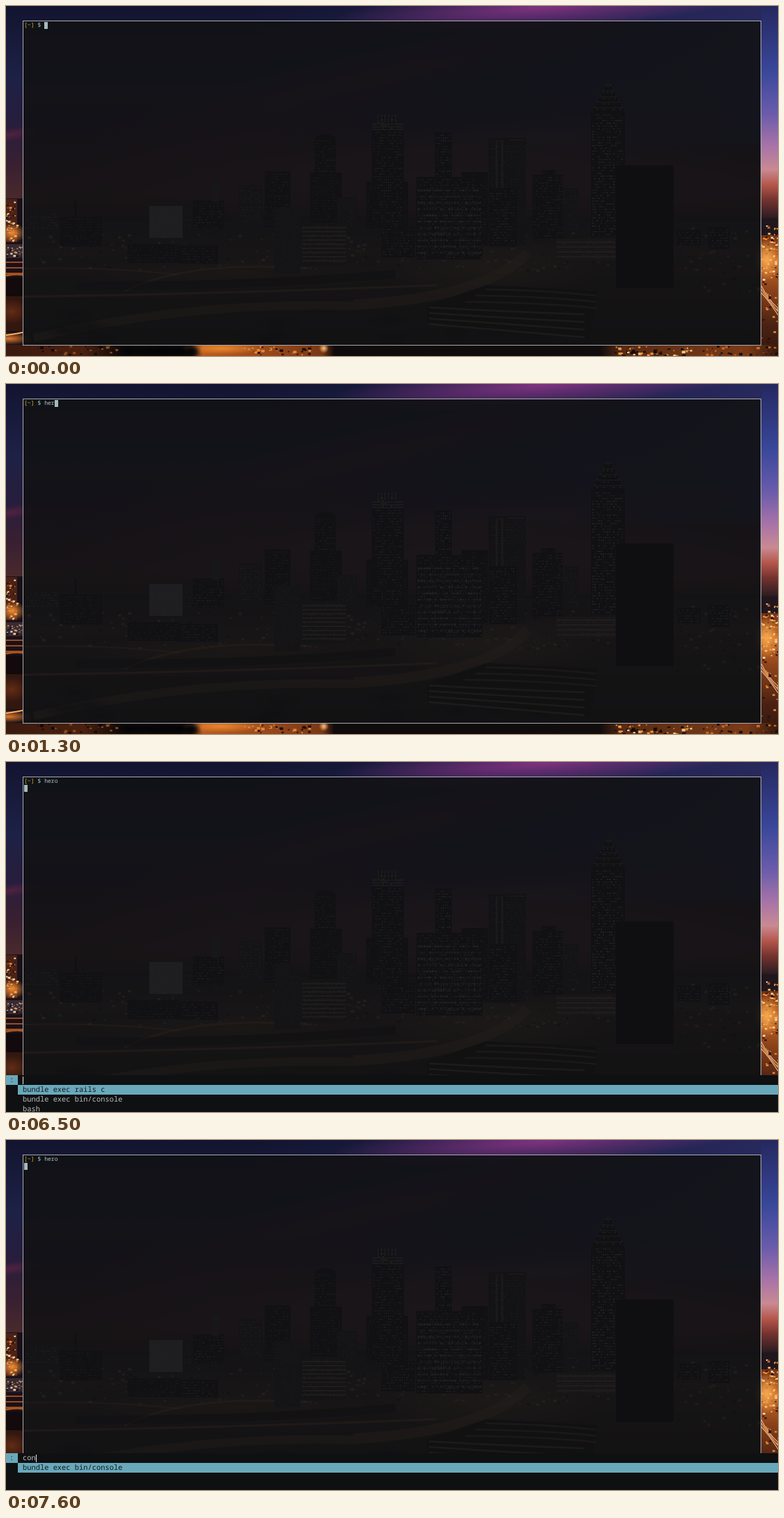
These frames come from a looping animation (1110 px wide and 504 px high, 8000 ms). An HTML page with a canvas:

```html
<!DOCTYPE html>
<html lang="en">
<head>
<meta charset="utf-8">
<title>Terminal launcher</title>
<style>
html, body { margin: 0; width: 100%; height: 100%; overflow: hidden; background: #0f1012; }
#stage { position: relative; width: 1110px; height: 504px; overflow: hidden;
  font-family: "Noto Sans Mono", monospace; text-rendering: geometricPrecision; white-space: pre; }
canvas { position: absolute; left: 0; top: 0; }
#shell { position: absolute; left: 26px; top: 23px; font-size: 8.1px; line-height: 10px; color: #adcbc2; }
#shell b { font-weight: 400; color: #c9b21f; }
#block { position: absolute; width: 5px; height: 10px; background: #a3bcbd; }
#menu { position: absolute; left: 0; width: 1110px; height: 110px; background: #0f1011;
  font-size: 10.4px; line-height: 14px; color: #b9bebd; }
#menu div { position: absolute; box-sizing: border-box; height: 14px; left: 17px; width: 1093px; padding-left: 7px; }
#menu .on, #menu .tag { background: #69a8bb; color: #10181b; }
#menu .tag { left: 0; top: 0; width: 17px; padding-left: 5px; }
#caret { position: absolute; top: 2px; width: 1px; height: 11px; background: #e4e8e8; }
</style>
</head>
<body>
<div id="stage">
  <canvas id="scene" width="1110" height="504"></canvas>
  <div id="shell"><b>[~]</b> $ <span id="typed"></span></div>
  <div id="block"></div>
  <div id="menu"></div>
</div>
<script>
const $ = id => document.getElementById(id);
const ctx = $('scene').getContext('2d');

let seed = 7;
const rand = () => (seed = (seed * 16807) % 2147483647) / 2147483647;

function rect(color, x, y, w, h) {
  ctx.fillStyle = color;
  ctx.fillRect(x, y, w, h);
}

function blend(x0, y0, x1, y1, colors) {
  const g = ctx.createLinearGradient(x0, y0, x1, y1);
  for (const [at, color] of colors) g.addColorStop(at, color);
  return g;
}

// Soft elliptical light
function glow(x, y, rx, ry, rgb, alpha, tilt = 0) {
  ctx.save();
  ctx.translate(x, y);
  ctx.rotate(tilt);
  ctx.scale(rx, ry);
  const g = ctx.createRadialGradient(0, 0, 0, 0, 0, 1);
  g.addColorStop(0, `rgba(${rgb},${alpha})`);
  g.addColorStop(.5, `rgba(${rgb},${alpha * .5})`);
  g.addColorStop(1, `rgba(${rgb},0)`);
  rect(g, -1, -1, 2, 2);
  ctx.restore();
}

function sparks(x, y, w, h, count, colors, size = 2) {
  for (let i = 0; i < count; i++) {
    const s = .7 + rand() * size;
    rect(colors[i % colors.length], x + rand() * w, y + rand() * h, s * 1.4, s);
  }
}

function tower(x, y, w, bottom, lit = .2, color = '#15121a') {
  rect(color, x, y, w, bottom - y);
  for (let r = y + 3; r < bottom - 2; r += 4)
    for (let c = x + 2; c < x + w - 2; c += 3)
      if (rand() < .6) rect(`rgba(225,205,195,${rand() * lit * 1.5})`, c, r, 2, 2);
}

function stripes(x, y, w, count, gap, color) {
  for (let i = 0; i < count; i++) rect(color, x, y + i * gap, w, 2);
}

function road(color, width, x0, y0, cx, cy, x1, y1) {
  ctx.strokeStyle = color;
  ctx.lineWidth = width;
  ctx.beginPath();
  ctx.moveTo(x0, y0);
  ctx.quadraticCurveTo(cx, cy, x1, y1);
  ctx.stroke();
}

function drawSky() {
  rect(blend(0, 0, 0, 310, [[0, '#12142f'], [.33, '#1d2146'], [.55, '#271d3c'],
    [.75, '#3a2030'], [.9, '#4a2a2c'], [1, '#2a1c1c']]), 0, 0, 1110, 504);
  rect(blend(350, 0, 1110, 0, [[0, 'rgba(46,46,104,0)'], [1, 'rgba(46,46,104,.8)']]), 0, 0, 1110, 200);
  glow(770, 2, 300, 32, '150,55,140', .8, -.06);
  glow(520, 105, 430, 38, '105,45,70', .5, -.22);
  glow(330, 190, 330, 40, '90,40,60', .45, -.18);
  glow(760, 190, 380, 30, '95,60,95', .5, -.1);
  glow(650, 245, 560, 85, '135,80,85', .6);
  glow(8, 185, 45, 10, '115,38,70', .5, -.15);
  rect(blend(1086, 0, 1086, 310, [[0, '#25285f'], [.3, '#39479a'], [.5, '#6a5cab'], [.65, '#a873a8'],
    [.76, '#c98a92'], [.83, '#b5574b'], [.9, '#74332f'], [1, '#20181f']]), 1086, 0, 24, 310);
}

function drawGround() {
  rect(blend(0, 300, 0, 504, [[0, '#211b20'], [.25, '#45352b'], [.6, '#30251e'], [1, '#181210']]), 0, 304, 1110, 200);
  glow(690, 375, 170, 45, '150,110,70', .6);
  glow(330, 385, 230, 25, '150,100,55', .45);
  const amber = 'rgba(215,145,80,.55)';
  road('rgba(170,125,85,.45)', 12, 40, 478, 260, 425, 500, 432);
  road('rgba(180,135,85,.45)', 15, 500, 430, 690, 420, 750, 355);
  road(amber, 3, 0, 419, 300, 415, 620, 402);
  road(amber, 3, 170, 411, 260, 365, 440, 378);
  road(amber, 2, 20, 378, 150, 375, 250, 387);
  road('rgba(0,0,0,.55)', 12, 100, 403, 350, 404, 560, 386);
  sparks(30, 325, 850, 55, 240, ['rgba(235,190,140,.65)', 'rgba(225,160,90,.55)', 'rgba(200,205,215,.5)', 'rgba(8,6,8,.6)'], 3);
  sparks(960, 318, 125, 100, 80, ['rgba(225,160,95,.6)', 'rgba(8,6,8,.6)'], 3);
  for (let i = 0; i < 14; i++)
    glow(30 + rand() * 800, 440 + rand() * 45, 35, 13, '0,0,0', .7);
}

function drawSkyline() {
  const haze = '#292530';
  tower(25, 296, 50, 325, .3, haze);
  tower(78, 303, 60, 346);
  tower(98, 280, 4, 305, 0);
  tower(206, 288, 48, 334, .12, '#868386');
  tower(254, 288, 16, 325, .2, haze);
  tower(269, 280, 45, 322, .35);
  tower(296, 254, 11, 282, .2, '#45444c');
  tower(335, 258, 34, 315, .25, haze);
  tower(372, 238, 37, 318, .25);
  ctx.beginPath();
  ctx.fillStyle = '#15121a';
  ctx.ellipse(459, 192, 15, 8, 0, 0, 7);
  ctx.fill();
  tower(444, 190, 30, 305, .3);
  tower(437, 240, 46, 312, .2);
  tower(476, 275, 28, 320, .2, haze);
  tower(518, 253, 60, 320, .2);
  tower(526, 178, 46, 320, .35);
  tower(533, 160, 28, 178, .6);
  stripes(527, 169, 44, 3, 4, 'rgba(205,195,190,.42)');
  for (let x = 534; x < 562; x += 5) rect('rgba(180,175,180,.45)', x, 156, 2, 12);
  tower(617, 182, 24, 258, .5);
  tower(655, 239, 38, 345, .25);
  tower(590, 246, 95, 365, .35);
  for (let y = 264; y < 360; y += 9)
    for (let x = 592; x < 681; x += 4) rect(`rgba(225,215,205,${rand() * .7})`, x, y, 3, 3);
  tower(694, 190, 53, 345, .2, '#251c1d');
  for (const x of [704, 712]) rect('rgba(200,150,115,.45)', x, 194, 3, 70);
  rect('rgba(210,125,55,.5)', 724, 192, 21, 2);
  tower(694, 262, 40, 346, .4);
  tower(757, 243, 44, 335, .35);
  tower(770, 236, 20, 245, .2);
  tower(803, 262, 20, 325, .2, haze);
  tower(841, 153, 49, 332, .55);
  for (let i = 0; i < 5; i++) {
    tower(844 + i * 4, 145 - i * 8, 44 - i * 8, 154 - i * 8, .5);
    rect('rgba(210,205,210,.45)', 845 + i * 4, 145 - i * 8, 42 - i * 8, 2);
  }
  rect('#4a4650', 865, 108, 2, 10);
  tower(386, 290, 37, 385, .15, '#302520');
  tower(424, 313, 65, 374, .25, '#352925');
  stripes(426, 318, 63, 9, 6, 'rgba(210,185,165,.5)');
  tower(540, 318, 48, 362, .4);
  tower(175, 343, 75, 370, .2);
  tower(250, 345, 55, 371, .3);
  tower(790, 335, 87, 366, .25, '#4c4038');
  stripes(792, 339, 84, 4, 7, 'rgba(210,190,165,.5)');
  rect('#000', 877, 229, 83, 177);
  rect('rgba(70,70,85,.4)', 877, 229, 83, 1);
  tower(965, 322, 34, 345, .35);
  tower(1010, 318, 30, 350, .35);
}

// Parking decks in the foreground
function drawDecks() {
  ctx.fillStyle = '#120e0c';
  ctx.beginPath();
  ctx.moveTo(604, 432);
  ctx.lineTo(690, 402);
  ctx.lineTo(850, 410);
  ctx.lineTo(840, 480);
  ctx.lineTo(606, 455);
  ctx.fill();
  for (let i = 0; i < 4; i++)
    road('rgba(205,180,135,.55)', 2.5, 608, 434 + i * 8, 715, 440 + i * 9, 832, 444 + i * 11);
  for (let i = 0; i < 3; i++)
    road('rgba(205,180,115,.45)', 2.5, 690 - i * 15, 408 + i * 9, 770, 409 + i * 9, 848, 417 + i * 9);
}

// The bright city rim that stays uncovered around the window
function drawRim() {
  const warm = ['#f58a2c', '#ffc878', '#a0441a', '#2c1210', '#f0dcb8'];
  rect('#1a1118', 0, 277, 24, 227);
  rect('#4a2218', 0, 278, 16, 62);
  sparks(0, 279, 15, 60, 60, warm);
  glow(9, 327, 20, 14, '255,150,55', .9);
  rect('#3a2a30', 0, 343, 24, 20);
  sparks(0, 344, 23, 18, 28, ['#e4d3b8', '#85828c', '#f09a4a', '#1a1014']);
  stripes(0, 368, 24, 3, 8, '#9a4a22');
  rect('#120a0c', 0, 391, 24, 27);
  road('#a8551f', 3, 0, 388, 14, 385, 24, 387);
  rect('#32170f', 0, 418, 24, 50);
  glow(8, 440, 24, 18, '130,58,25', .6);
  glow(4, 479, 35, 9, '245,130,45', .9);
  road('#ffb060', 2, 0, 474, 15, 472, 24, 470);

  rect('#20161c', 1086, 306, 24, 25);
  rect(blend(0, 330, 0, 504, [[0, '#6a2f16'], [.2, '#cc6a26'], [.45, '#8a421a'],
    [.75, '#4a2112'], [1, '#32170f']]), 1086, 330, 24, 174);
  sparks(1086, 314, 24, 88, 80, warm);
  glow(1094, 365, 18, 30, '255,180,85', .85);
  for (let i = 0; i < 3; i++) road('#f0b580', 1.2, 1086, 403 + i * 5, 1096, 423, 1110, 435 + i * 5);
  sparks(1086, 410, 24, 75, 24, ['#e08a3a', '#2a110c']);

  rect(blend(0, 0, 1110, 0, [[0, '#3a1a0f'], [.1, '#4a2010'], [.15, '#0c0808'], [.24, '#140b09'],
    [.255, '#b85c20'], [.33, '#9c4a1b'], [.41, '#7a3816'], [.425, '#100b0b'], [.77, '#120d0d'],
    [.8, '#5a2b14'], [.88, '#6a3416'], [.96, '#7a3a18'], [1, '#35190f']]), 0, 488, 1110, 16);
  glow(310, 493, 60, 9, '255,150,50', .75);
  glow(457, 493, 7, 7, '255,195,120', 1);
  sparks(40, 488, 120, 14, 30, ['#8a4a20', '#120909'], 3);
  for (let i = 0; i < 16; i++) glow(165 + rand() * 105, 497, 12, 9, '4,4,6', .9);
  sparks(340, 489, 100, 13, 34, ['#e08a3c', '#1b0e0a'], 3);
  sparks(870, 490, 120, 13, 60, ['#e8943c', '#1c100c', '#f0c88c', '#140c0a'], 3);
  sparks(1000, 489, 110, 13, 34, ['#c46a2a', '#180e0b'], 3);
}

function drawScene() {
  drawSky();
  drawGround();
  drawSkyline();
  drawDecks();
  drawRim();
  rect('rgba(17,17,20,.885)', 24, 21, 1062, 468);
  ctx.strokeStyle = '#aaa9af';
  ctx.lineWidth = 1;
  ctx.strokeRect(24.5, 21.5, 1061, 467);
}

const apps = ['gf-api-production', 'gf-api-sandbox', 'gf-api-staging',
  'fathomless-escarpment-9185', 'gf-rails-sandbox', 'gf-rails-staging'];
const commands = ['bundle exec rails c', 'bundle exec bin/console', 'bash'];

const steps = [
  { at: 0, typed: '' },
  { at: 500, typed: 'h' },
  { at: 600, typed: 'he' },
  { at: 1300, typed: 'her' },
  { at: 1400, typed: 'hero' },
  { at: 1900, typed: 'hero', top: 409, items: apps, query: '' },
  { at: 6500, typed: 'hero', top: 451, items: commands, query: '' },
  { at: 7300, typed: 'hero', top: 451, items: commands, query: 'c' },
  { at: 7500, typed: 'hero', top: 451, items: commands, query: 'co' },
  { at: 7600, typed: 'hero', top: 451, items: commands, query: 'con' },
];
const LOOP = 8000;

function show({ typed, top, items, query }) {
  $('typed').textContent = typed;
  $('block').style.left = (items ? 26 : Math.round(55 + typed.length * 4.88)) + 'px';
  $('block').style.top = (items ? 33 : 23) + 'px';
  const menu = $('menu');
  menu.style.display = items ? 'block' : 'none';
  if (!items) return;
  menu.style.top = top + 'px';
  const rows = items.filter(item => item.includes(query));
  menu.innerHTML = `<div class="tag">:</div><div style="top:0">${query}</div>` +
    rows.map((item, i) => `<div class="${i ? '' : 'on'}" style="top:${14 * (i + 1)}px">${item}</div>`).join('') +
    `<span id="caret" style="left:${24 + Math.round(query.length * 6.24)}px"></span>`;
}

let current;
const start = performance.now();
function tick(now) {
  const t = Math.max(0, now - start) % LOOP;
  const step = steps.findLast(s => s.at <= t);
  if (step !== current) show(current = step);
  requestAnimationFrame(tick);
}

drawScene();
show(current = steps[0]);
requestAnimationFrame(tick);
</script>
</body>
</html>
```
